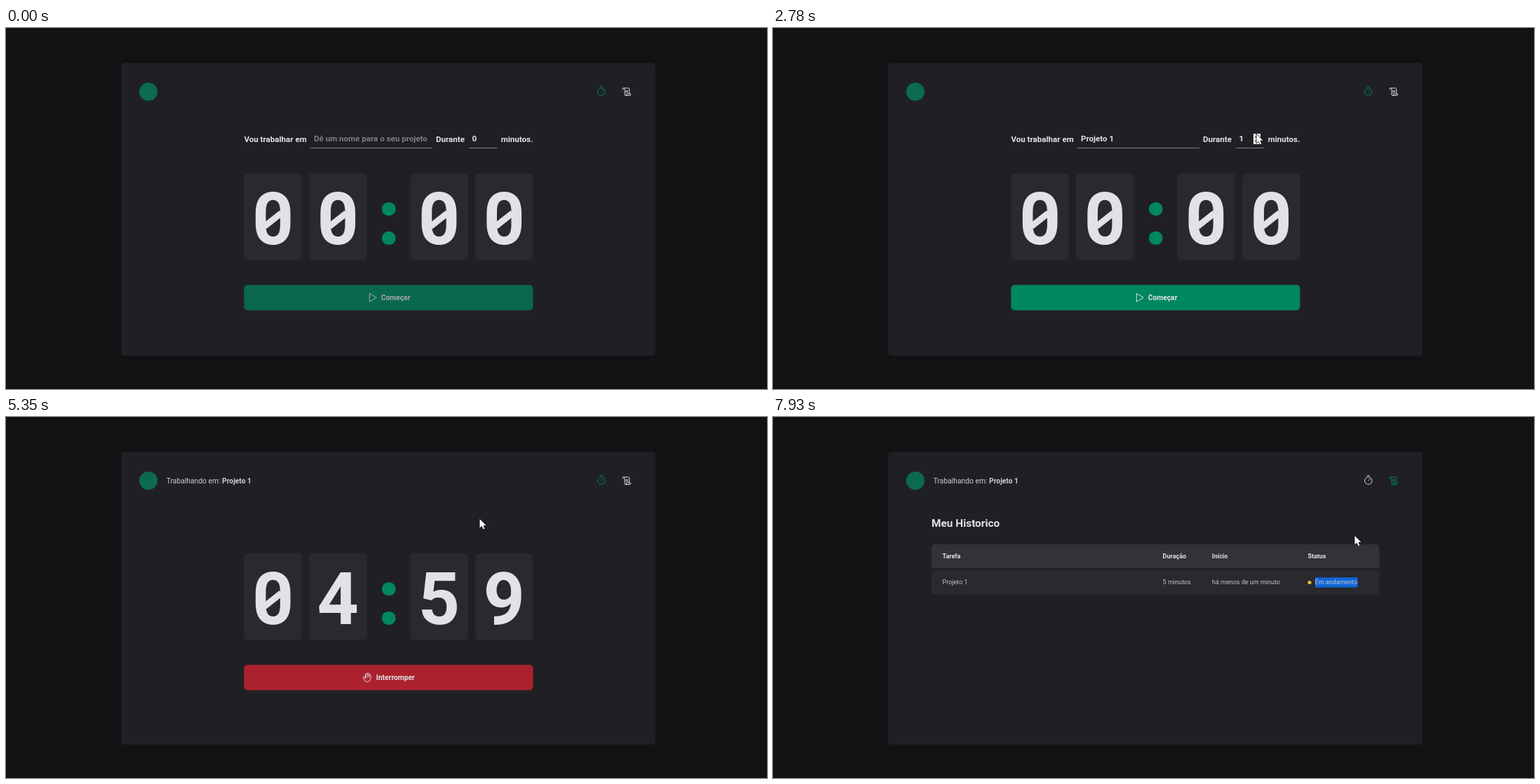
An HTML page that plays this animation: 1085 px wide and 516 px high, repeating every 8000 ms.

```html
<!DOCTYPE html>
<html lang="pt-BR">
<head>
<meta charset="utf-8">
<title>Timer</title>
<style>
  html, body { margin: 0; height: 100%; overflow: hidden; background: #121214; }
  svg { display: block; }
  text { font: 10.3px Roboto, sans-serif; fill: #e1e1e6; white-space: pre; }
  .b { font-weight: 700; }
  .form text { font-size: 11.58px; font-weight: 700; }
  .cells text { font-size: 9px; }
  .row text { fill: #c4c4cc; }
  .digit { font-size: 103.5px; font-weight: 700; text-anchor: middle; }
  .list text { font: 9.75px "Open Sans", sans-serif; fill: #fff; }
  .icon { fill: none; stroke-width: 16; stroke-linecap: round; stroke-linejoin: round; stroke: #e1e1e6; }
</style>
</head>
<body>
<svg width="1085" height="516" viewBox="0 0 1085 516">
  <rect x="164" y="50" width="762" height="418.5" rx="5" fill="#202024"/>
  <circle cx="203" cy="91" r="13" fill="#0b6b4f"/>
  <path id="timerIcon" class="icon" transform="translate(841.1 83.3) scale(.06)"
    d="M40 128a88 88 0 1 0 176 0a88 88 0 1 0-176 0M128 128L168 88M104 8h48"/>
  <path id="scrollIcon" class="icon" transform="translate(876.8 83.5) scale(.06)"
    d="M48 80s-8-6-8-16a24 24 0 0 1 48 0v128a24 24 0 0 0 48 0c0-10-8-16-8-16h96s8 6 8 16a24 24 0 0 1-24 24H112M64 40H176a24 24 0 0 1 24 24V176M112 104h56M112 136h56"/>
  <rect id="hoverLine" x="868" y="106" width="34" height="2" fill="#00875f"/>
  <rect id="ring" x="868.7" y="74.7" width="33" height="32.2" fill="none" stroke="#00875f" stroke-width="1.5"/>

  <g id="working">
    <text x="228.8" y="95" fill-opacity=".9">Trabalhando em: <tspan class="b">Projeto 1</tspan></text>
  </g>

  <g id="form" class="form">
    <text x="339.4" y="163">Vou trabalhar em</text>
    <text id="project" x="439" y="162.4"></text>
    <text x="613" y="163">Durante</text>
    <text id="minutes" x="664.6" y="162.4"></text>
    <text x="705.7" y="163">minutos.</text>
    <path d="M433.5 171.5H608M659.6 171.5H700.5" stroke="#7c7c8a"/>
    <rect id="caret" y="152" width="1" height="14" fill="#fff"/>
    <g id="spinner">
      <rect x="685" y="151" width="10" height="15" fill="#fff"/>
      <path d="M687.5 156.5l2.5-2.5l2.5 2.5M687.5 160.5l2.5 2.5l2.5-2.5" fill="none" stroke="#333" stroke-width="1.5"/>
    </g>
  </g>

  <g id="clock">
    <g fill="#00875f">
      <rect x="536" y="249.2" width="19.5" height="19" rx="9" />
      <rect x="536" y="290.8" width="19.5" height="19" rx="9" />
    </g>
  </g>

  <g id="start">
    <rect id="startFill" x="339.4" y="367.2" width="412" height="36.3" rx="5"/>
    <path d="M518.3 379.5V391.2L528.2 385.4Z" fill="none" stroke="#e1e1e6" stroke-linejoin="round"/>
    <text class="b" x="534.7" y="389">Começar</text>
  </g>

  <g id="stop">
    <rect id="stopFill" x="339.4" y="354.3" width="412" height="36.3" rx="5"/>
    <path class="icon" transform="translate(507.4 364.5) scale(.06)"
      d="M88 140V60a20 20 0 0 1 40 0v64M128 60V44a20 20 0 0 1 40 0v80M168 76a20 20 0 0 1 40 0v76a80 80 0 0 1-152 34L30 142a20 20 0 0 1 35-20L88 160V60"/>
    <text class="b" x="527.8" y="376">Interromper</text>
  </g>

  <g id="history">
    <text class="b" x="226" y="157" style="font-size:15.4px">Meu Historico</text>
    <path d="M226 216V187a5 5 0 0 1 5-5H859.5a5 5 0 0 1 5 5V216Z" fill="#323238"/>
    <rect x="226" y="218.5" width="638.5" height="35.2" fill="#29292e"/>
    <rect id="selection" x="773" y="229.3" height="14.2" fill="#0f67d8"/>
    <g class="cells b">
      <text class="b" x="241.6" y="202">Tarefa</text>
      <text class="b" x="555.6" y="202">Duração</text>
      <text class="b" x="626" y="202">Início</text>
      <text class="b" x="762.4" y="202">Status</text>
    </g>
    <g class="cells row">
      <text x="241.6" y="239">Projeto 1</text>
      <text x="555.6" y="239">5 minutos</text>
      <text x="626" y="239">há menos de um minuto</text>
      <text x="772.6" y="239">Em andamento</text>
    </g>
    <circle id="dot" cx="765" cy="236.5" r="2.6"/>
  </g>

  <g id="list" class="list">
    <path d="M504 179H514L520 173L526 179H870V366.5H504Z" fill="#292a2d"/>
    <path d="M504 272.5H870" stroke="#3f4145"/>
    <clipPath id="listClip"><rect x="504" y="179" width="357" height="188"/></clipPath>
    <g id="items" clip-path="url(#listClip)"></g>
  </g>

  <g id="status" class="list">
    <path d="M0 503H62a4 4 0 0 1 4 4V516H0Z" fill="#202124"/>
    <text x="0" y="515" style="font-size:9.06px;fill:#d5d7da">localhost:5173</text>
  </g>

  <path id="cursor" d="M0 0V14.3L3.3 11.3L5.3 16L8 14.9L6 10.2H10.4Z" fill="#fff" stroke="#000" stroke-width=".8"/>
</svg>
<script>
const LOOP = 8000, GREEN = '#00875f', LIGHT = '#e1e1e6';
const $ = id => document.getElementById(id);
const show = (id, on) => $(id).style.display = on ? '' : 'none';

function add(parent, tag, attrs, text = '') {
  const el = document.createElementNS('http://www.w3.org/2000/svg', tag);
  for (const k in attrs) el.setAttribute(k, attrs[k]);
  el.textContent = text;
  return parent.appendChild(el);
}

const digits = [339.4, 432.1, 576.3, 669].map(x => {
  const c = x + 41.2;
  add($('clock'), 'rect', { x, y: 208, width: 82.4, height: 123.4, rx: 5, fill: '#29292e' });
  return {
    glyph: add($('clock'), 'text', { class: 'digit', x: c, y: 309 }),
    slash: add($('clock'), 'path', { d: `M${c - 12} 283.5L${c + 12} 264.5`, stroke: LIGHT, 'stroke-width': 9 })
  };
});

const key = 'dfzshbdsrfh';
['Projeto 1', 'Projeto 2', 'Projeto 3', key, 'Estudar', key.repeat(7)].forEach((s, i) =>
  add($('items'), 'text', { x: 513, y: 201 + 29 * i + (i > 2 ? 7 : 0) }, s));

// Cursor: time, x, y
const path = [
  [120, 1012, 505], [500, 760, 330], [880, 491, 172], [950, 488, 164], [1130, 488, 163],
  [1270, 510, 182], [1480, 522, 196], [1640, 522, 196], [1700, 530, 198], [1910, 620, 190],
  [2380, 682, 146], [2580, 689, 151], [3230, 689, 151], [3520, 588, 337], [3660, 552, 369],
  [3800, 550, 380], [4130, 547, 382], [4380, 547, 382], [4590, 551, 387], [4810, 551, 387],
  [5000, 498, 346], [5350, 675, 145], [5550, 829, 108], [5760, 884, 92], [6000, 884, 92],
  [6370, 824, 130], [6570, 771, 194], [6840, 762, 232], [7040, 762, 232], [7180, 752, 236],
  [7570, 837, 237], [7710, 837, 237], [7930, 829, 169]
];

// The pointer advances in steps of about 70 ms
function cursorAt(t) {
  const i = path.findIndex(p => p[0] > t);
  if (i < 1) return path[i < 0 ? path.length - 1 : 0].slice(1);
  const [t0, x0, y0] = path[i - 1], [t1, x1, y1] = path[i];
  const n = Math.max(1, Math.round((t1 - t0) / 70));
  const k = Math.floor((t - t0) / (t1 - t0) * n) / n;
  return [x0 + (x1 - x0) * k, y0 + (y1 - y0) * k];
}

function draw(t) {
  const within = (a, b) => t >= a && t < b;
  const running = t >= 3800, history = t >= 6000, chosen = t >= 1640;
  const [x, y] = cursorAt(t);

  show('cursor', t >= 120);
  $('cursor').setAttribute('transform', `translate(${x} ${y})`);

  show('form', !running);
  show('start', !running);
  show('working', running);
  show('stop', running && !history);
  show('clock', !history);
  show('history', history);
  show('list', within(1060, 1640));
  show('caret', within(1060, 2720));
  show('spinner', within(2310, 3800));
  show('status', within(5690, 6720));
  show('hoverLine', within(5690, 6100));
  show('ring', within(6000, 7250));

  $('project').textContent = chosen ? 'Projeto 1' : 'Dê um nome para o seu projeto';
  $('project').style.fill = chosen ? LIGHT : '#7c7c8a';
  $('caret').setAttribute('x', chosen ? 486 : 439);
  $('minutes').textContent = t < 2720 ? 0 : Math.min(5, 1 + Math.floor((t - 2720) / 110));

  $('start').style.opacity = chosen ? 1 : .7;
  $('startFill').style.fill = t >= 3700 ? '#015f43' : GREEN;
  $('stopFill').style.fill = t < 5010 ? '#7a1921' : '#ab222e';
  $('timerIcon').style.stroke = history ? LIGHT : GREEN;
  $('scrollIcon').style.stroke = history ? GREEN : LIGHT;

  const time = !running ? '0000' : t < 4810 ? '0500' : t < 5820 ? '0459' : '0458';
  digits.forEach(({ glyph, slash }, i) => {
    glyph.textContent = time[i];
    slash.style.display = time[i] === '0' ? '' : 'none';
  });
  $('clock').setAttribute('transform', `translate(0 ${running ? -12.9 : 0})`);

  const end = t < 7180 ? 773 : t < 7570 ? x : 833.5;
  $('selection').setAttribute('width', Math.max(0, Math.min(833.5, end) - 773));
  $('dot').style.fill = t < 7250 ? '#e0a24a' : '#d6c63c';
}

const begin = performance.now();
(function frame() {
  draw((performance.now() - begin) % LOOP);
  requestAnimationFrame(frame);
})();
</script>
</body>
</html>
```
